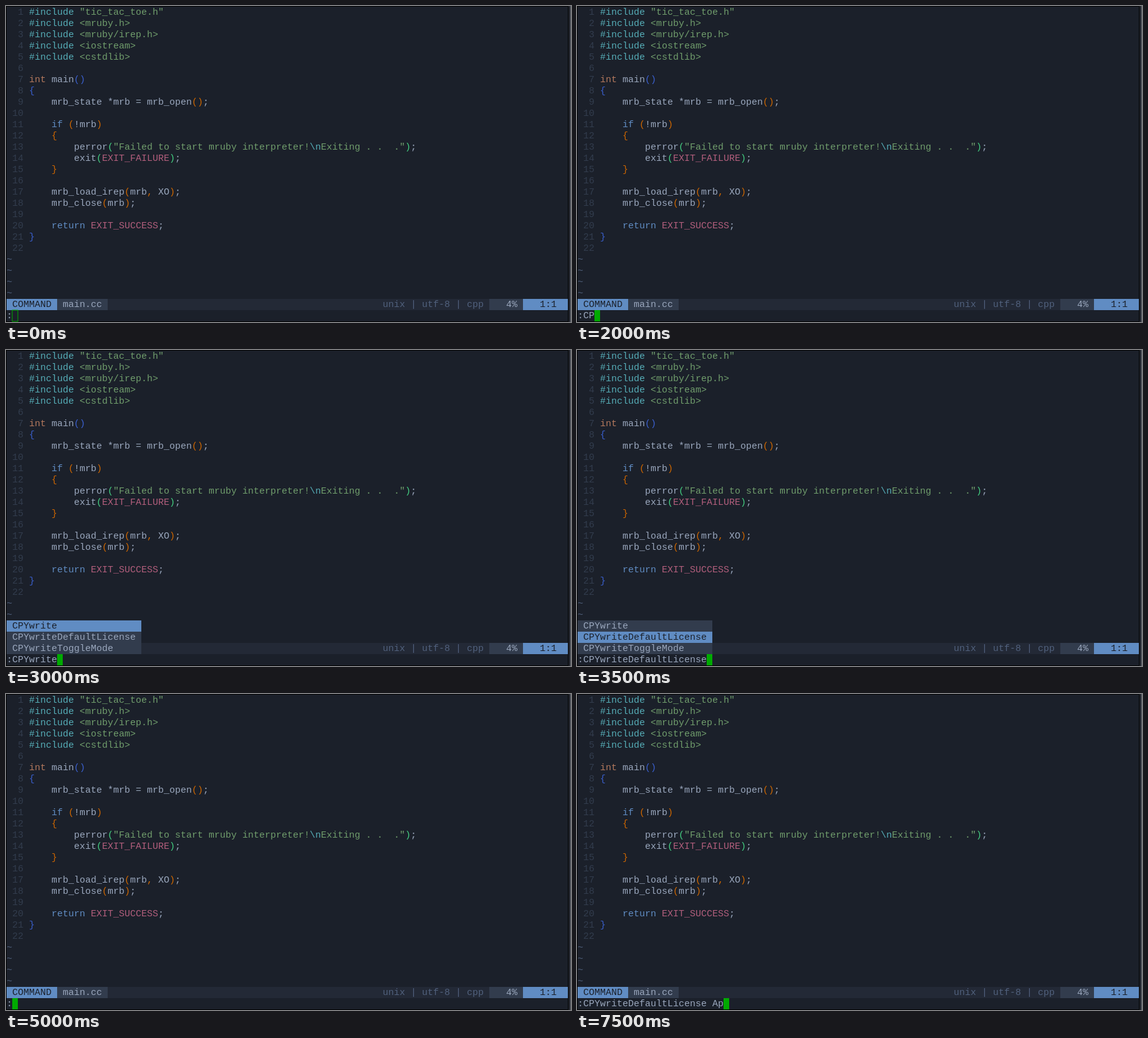
Animation of 906 by 506 pixels, one loop 8 s. Source, as an HTML page:

```html
<!DOCTYPE html>
<html lang="en">
<head>
<meta charset="utf-8">
<title>Editor command line</title>
<style>
  html, body { margin: 0; width: 100%; height: 100%; overflow: hidden; background: #000; }
  svg { display: block; }
  text { font: 15px "Liberation Mono", monospace; white-space: pre; }
</style>
</head>
<body>
<svg id="stage" width="906" height="506" viewBox="0 0 906 506">
  <rect width="906" height="506" fill="#000"/>
  <rect x="1" y="1" width="900" height="504" fill="#1b202a"/>
  <rect x="902" width="3" height="506" fill="#24272f"/>
  <rect x="905" width="1" height="506" fill="#70737a"/>
  <g id="screen"></g>
  <g id="live"></g>
</svg>
<script>
const CELL_W = 9, CELL_H = 18, LOOP = 8000;
const STATUS_ROW = 26, CMD_ROW = 27;

const C = {
  bg: '#1b202a', bar: '#232936', panel: '#323c4d', dim: '#51617d',
  fg: '#9aa7bd', blue: '#608cc3', cursor: '#00aa00'
};

// One letter per syntax group; 1-3 are the nested bracket levels.
const SYNTAX = {
  f: C.fg, c: '#56adb7', s: '#709d6c', t: '#b3785d', k: C.blue, m: '#b15e7c',
  1: '#3a5fcd', 2: '#cd6600', 3: '#43cd80'
};

const CODE = [
  '~c#include ~s"tic_tac_toe.h"',
  '~c#include ~s<mruby.h>',
  '~c#include ~s<mruby/irep.h>',
  '~c#include ~s<iostream>',
  '~c#include ~s<cstdlib>',
  '',
  '~tint~f main~1()',
  '~1{',
  '~f    mrb_state *mrb = mrb_open~2()~f;',
  '',
  '~k    if ~2(~f!mrb~2)',
  '~2    {',
  '~f        perror~3(~s"Failed to start mruby interpreter!~c\\n~sExiting . .  ."~3)~f;',
  '~f        exit~3(~mEXIT_FAILURE~3)~f;',
  '~2    }',
  '',
  '~f    mrb_load_irep~2(~fmrb~2,~f XO~2)~f;',
  '~f    mrb_close~2(~fmrb~2)~f;',
  '',
  '~k    return ~mEXIT_SUCCESS~f;',
  '~1}',
  ''
];

const MENU = ['CPYwrite', 'CPYwriteDefaultLicense', 'CPYwriteToggleMode'];
const FULL = ':' + MENU[1];

const STEPS = [
  { at: 0, cmd: ':', hollow: true },
  { at: 500, cmd: ':' },
  { at: 2000, cmd: ':CP' },
  { at: 2500, cmd: ':CPY' },
  { at: 3000, cmd: ':' + MENU[0], pick: 0 },
  { at: 3500, cmd: FULL, pick: 1 },
  { at: 4000, normal: true },
  { at: 5000, cmd: ':' },
  { at: 5500, cmd: FULL },
  { at: 6500, cmd: FULL + ' ' },
  { at: 7000, cmd: FULL + ' A' },
  { at: 7500, cmd: FULL + ' Ap' }
];

const screenLayer = document.getElementById('screen');
const liveLayer = document.getElementById('live');
let layer = screenLayer;

function add(tag, attrs) {
  const el = document.createElementNS('http://www.w3.org/2000/svg', tag);
  for (const name in attrs) el.setAttribute(name, attrs[name]);
  return layer.appendChild(el);
}

const left = col => 1 + col * CELL_W;
const top_ = row => 1 + row * CELL_H;

function block(col, row, cells, fill) {
  return add('rect', { x: left(col), y: top_(row), width: cells * CELL_W, height: CELL_H, fill });
}

function write(col, row, str, fill) {
  const start = str.search(/\S/);
  if (start < 0) return;
  add('text', { x: left(col + start), y: top_(row) + 13, fill }).textContent = str.trim();
}

function label(col, row, cells, str, fill, back) {
  block(col, row, cells, back);
  write(col, row, str, fill);
}

function drawScreen() {
  CODE.forEach((line, row) => {
    write(0, row, String(row + 1).padStart(3), C.panel);
    let col = 4;
    for (const part of line.split('~').slice(1)) {
      const str = part.slice(1);
      write(col, row, str, SYNTAX[part[0]]);
      col += str.length;
    }
  });
  for (let row = CODE.length; row < STATUS_ROW; row++) write(0, row, '~', C.dim);
  label(0, STATUS_ROW, 100, '', C.dim, C.bar);
  write(67, STATUS_ROW, 'unix | utf-8 | cpp', C.dim);
  label(86, STATUS_ROW, 6, '   4%', C.fg, C.panel);
  label(92, STATUS_ROW, 8, '   1:1', C.bg, C.blue);
}

function drawStep({ cmd = '', normal, hollow, pick }) {
  liveLayer.replaceChildren();
  layer = liveLayer;

  const mode = normal ? ' NORMAL ' : ' COMMAND ';
  label(0, STATUS_ROW, mode.length, mode, C.bg, C.blue);
  label(mode.length, STATUS_ROW, 9, ' main.cc', C.fg, C.panel);

  if (pick !== undefined) {
    MENU.forEach((item, i) => {
      const on = i === pick;
      label(0, 24 + i, 24, ' ' + item, on ? C.bg : C.fg, on ? C.blue : C.panel);
    });
  }

  write(0, CMD_ROW, cmd, C.fg);
  if (normal) {
    label(4, 0, 1, '#', C.bg, C.cursor);
  } else {
    const cursor = block(cmd.length, CMD_ROW, 1, hollow ? 'none' : C.cursor);
    if (hollow) cursor.setAttribute('stroke', C.cursor);
  }
}

drawScreen();
let shown = null;
const begin = performance.now();

function tick() {
  const time = (performance.now() - begin) % LOOP;
  const step = STEPS.findLast(s => s.at <= time);
  if (step !== shown) drawStep(shown = step);
  requestAnimationFrame(tick);
}
tick();
</script>
</body>
</html>
```
